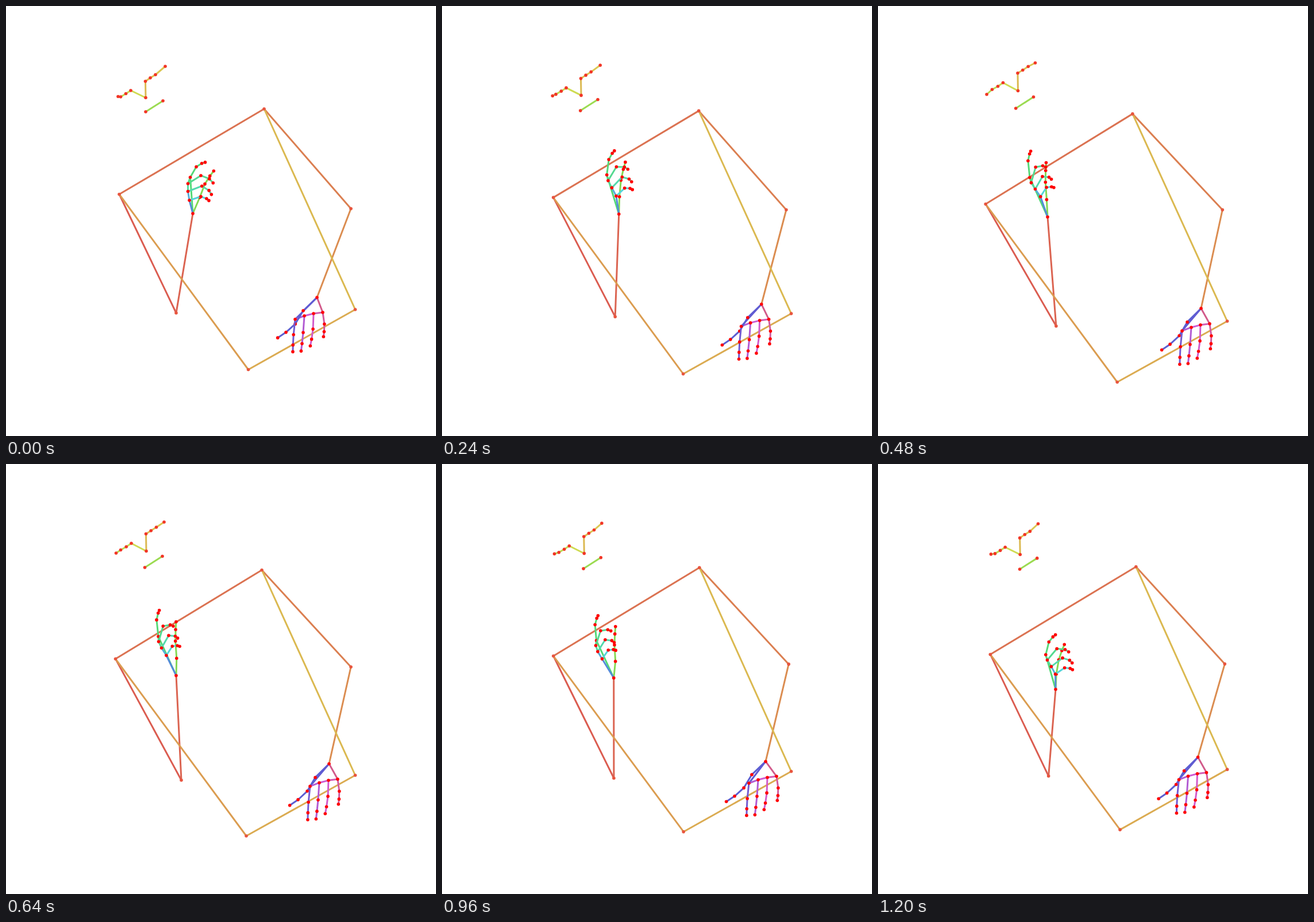
An HTML page that plays this animation: 748 by 748 pixels, repeating every 1.28 s.

```html
<!DOCTYPE html>
<html lang="en">
<head>
<meta charset="utf-8">
<title>Pose skeleton</title>
<style>
  html, body { margin: 0; width: 100%; height: 100%; overflow: hidden; background: #fff; }
  svg { display: block; width: 100vw; height: 100vh; }
  line { stroke-width: 3; stroke-linecap: round; }
</style>
</head>
<body>
<svg id="stage" viewBox="0 0 748 748"></svg>
<script>
const STEP = 80, STEPS = 16;
const stage = document.getElementById("stage");
const lines = [], dots = [];

// Key moments, in steps, and the few signals that drive everything
const keys = [0, 2, 4, 6, 8, 10, 13, 15];
const bob = [0, 0.3, 0.78, 1.5, 1, 0.83, 0.35, 0.25];
const sway = [0, -1.2, -1.5, -1, 0, 2.3, 4.3, 4];

// Body and face joints: x, y, bob in x and y, sway in x and y
const rig = {
  shoulderL: [197, 327.5, -6.5, 11.5, 0, 0.2],
  shoulderR: [449, 179, -4, 5.5, 0.2, -0.4],
  elbowL: [296, 534, 9, 16, -0.4, 1.2],
  elbowR: [600, 352.5, 0, 0.5, 0.8, -1.2],
  hipL: [421.5, 632.5, -3.5, 14.5, 0.1, 0],
  hipR: [607.5, 528, 0, 13.5, 0, 0],
  nose: [243, 159.5, 1, -8, 1, 0],
  eyeL0: [217, 147, 1, -9, 1, 0],
  eyeL1: [208.5, 152.5, 0.7, -8.5, 1, 0],
  eyeL2: [199.5, 158, 0, -8.5, 1, 0],
  earL: [195, 157.5, -3.5, -2.5, 0.6, 0],
  eyeR0: [242.5, 131, 1, -9.5, 1, 0],
  eyeR1: [251, 125, 1.2, -9, 1, 0],
  eyeR2: [260, 119.5, 1.5, -9.5, 1, 0],
  earR: [277, 105, -2, -4, 0.5, 0],
  mouthL: [243, 184, -1.5, -4, 1, 0],
  mouthR: [273, 165, -1, -4.5, 1, 0]
};

// Fingers from thumb to pinky: knuckle x, y from the wrist, length, heading, curl, taper
const curled = [
  [12, -28, 25, -69, 11, 0.66],
  [-4.5, -63, 21, -60, 28, 0.54],
  [-8.5, -52, 26.5, -32, 53, 0.6],
  [-8.5, -38.5, 26, -21, 53, 0.56],
  [-6, -23, 21, -18, 38, 0.5]
];
const upright = [
  [2, -30, 30, -94, 5, 0.67],
  [-31, -68, 29, -96, 19, 0.42],
  [-31.5, -59, 28, -74, 64, 0.45],
  [-27.5, -48, 25, -60, 66, 0.46],
  [-19.5, -35, 19, -57, 50, 0.47]
];
const hanging = [
  [-24, 23, 27, 121, 17, 0.8],
  [-38, 38, 27, 96, -3, 0.66],
  [-22, 32, 29, 94, 2, 0.67],
  [-6, 28, 27, 92, 6, 0.66],
  [10, 26, 20.5, 82, 10, 0.65]
];

// Wrist path, roll of the palm, stretch in y, and the mix of both finger poses
const hands = {
  left: {
    from: curled, to: upright, rollBy: [-6, 0, 5, 10, 12],
    x: [325, 322, 294, 295, 296, 296, 301, 309],
    y: [361, 364.5, 360, 367, 368, 368, 376, 392],
    roll: [0, 0.5, 1, 0.6, 0.2, 0, 0, 1],
    stretch: [1, 1.04, 1.02, 1.01, 1, 1, 0.94, 0.92],
    mix: [0, 0.25, 0.97, 1, 1, 1, 0.9, 0.48]
  },
  right: {
    from: hanging, to: hanging, rollBy: [0, 9, 9, 9, 9],
    x: [541, 550.5, 560, 562, 562, 564.5, 561.5, 556.5],
    y: [507, 513, 524, 526, 521.5, 525, 513.5, 510],
    roll: [0, 0.12, 0.5, 0.55, 0.55, 0.82, 1, 0.55],
    stretch: [1, 0.99, 1.035, 1.03, 1.03, 1.02, 0.99, 1.03],
    mix: keys.map(() => 0)
  }
};

// Smooth periodic curve through the key values
function curve(values, s) {
  const n = keys.length;
  const value = i => values[(i + n) % n];
  const time = i => keys[(i + n) % n] + STEPS * Math.floor(i / n);
  const slope = i => (value(i + 1) - value(i - 1)) / (time(i + 1) - time(i - 1));
  let i = n - 1;
  while (keys[i] > s) i--;
  const span = time(i + 1) - time(i), u = (s - time(i)) / span, v = 1 - u;
  return v * v * (1 + 2 * u) * value(i) + u * u * (1 + 2 * v) * value(i + 1)
    + span * u * v * (v * slope(i) - u * slope(i + 1));
}

function poseHand(at, side, s) {
  const hand = hands[side];
  const [wx, wy, roll, stretch, mix] =
    ["x", "y", "roll", "stretch", "mix"].map(k => curve(hand[k], s));
  at[side] = [wx, wy];
  hand.from.forEach((finger, f) => {
    let [x, y, length, heading, curl, taper] =
      finger.map((v, k) => v + (hand.to[f][k] - v) * mix);
    x += hand.rollBy[f] * roll;
    for (let j = 0; j < 4; j++) {
      at[side + f + j] = [wx + x, wy + y * stretch];
      const angle = (heading + curl * [0, 1, 1.5, 0][j]) * Math.PI / 180;
      x += length * Math.cos(angle);
      y += length * Math.sin(angle);
      length *= taper;
    }
  });
}

function pose(s) {
  const at = {}, b = curve(bob, s), w = curve(sway, s);
  for (const name in rig) {
    const [x, y, bx, by, sx, sy] = rig[name];
    at[name] = [x + bx * b + sx * w, y + by * b + sy * w];
  }
  poseHand(at, "left", s);
  poseHand(at, "right", s);
  return at;
}

function add(tag, attrs) {
  const el = document.createElementNS("http://www.w3.org/2000/svg", tag);
  for (const k in attrs) el.setAttribute(k, attrs[k]);
  return stage.appendChild(el);
}

function link(a, b, hue, sat = 66) {
  lines.push([add("line", { stroke: `hsl(${hue} ${sat}% 59%)` }), a, b]);
}

function chain(names, hue, drift = 0) {
  names.slice(1).forEach((name, i) => link(names[i], name, hue + drift * i));
}

function addDots(names, fill) {
  for (const name of names) dots.push([add("circle", { r: 2.8, fill }), name]);
}

function addHand(side, fingerHues, palmHues, sat) {
  const palm = [side, ...[1, 2, 3, 4].map(f => side + f + 0), side];
  link(side, side + "00", fingerHues[0], sat);
  palmHues.forEach((hue, i) => link(palm[i], palm[i + 1], hue, sat));
  fingerHues.forEach((hue, f) => {
    for (let j = 1; j < 4; j++) link(side + f + (j - 1), side + f + j, hue, sat);
    addDots([0, 1, 2, 3].map(j => side + f + j), "#f00");
  });
  addDots([side], "#f00");
}

link("shoulderL", "shoulderR", 14);
chain(["shoulderL", "elbowL", "left"], 5, 3);
chain(["shoulderR", "elbowR", "right"], 20, 6);
chain(["shoulderL", "hipL", "hipR", "shoulderR"], 33, 6);
chain(["nose", "eyeR0", "eyeR1", "eyeR2", "earR"], 45, 2);
chain(["nose", "eyeL0", "eyeL1", "eyeL2", "earL"], 66, 4);
link("mouthL", "mouthR", 88);
const joints = Object.keys(rig);
addDots(joints.slice(0, 6), "#e8553f");
addDots(joints.slice(6), "#f23626");
addHand("left", [98, 136, 147, 160, 182], [136, 142, 152, 200, 215], 64);
addHand("right", [238, 252, 284, 304, 326], [243, 284, 298, 316, 336], 57);

function draw(ms) {
  const at = pose(Math.floor(ms / STEP) % STEPS);
  for (const [el, a, b] of lines) {
    el.setAttribute("x1", at[a][0]);
    el.setAttribute("y1", at[a][1]);
    el.setAttribute("x2", at[b][0]);
    el.setAttribute("y2", at[b][1]);
  }
  for (const [el, name] of dots) {
    el.setAttribute("cx", at[name][0]);
    el.setAttribute("cy", at[name][1]);
  }
}

const start = performance.now();
function tick() {
  draw(performance.now() - start);
  requestAnimationFrame(tick);
}
tick();
</script>
</body>
</html>
```
